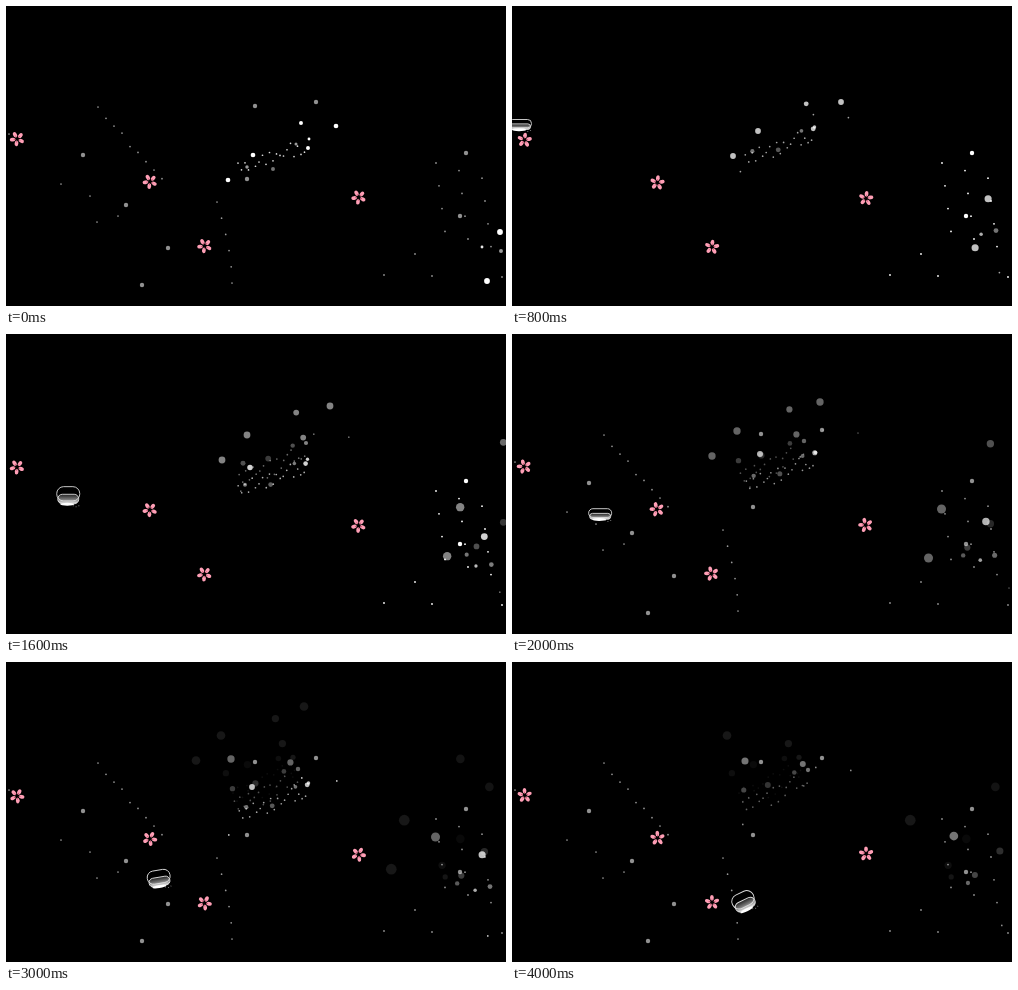
An HTML page with a canvas that plays this animation: 500 px wide and 300 px high, repeating every 4200 ms.

```html
<!DOCTYPE html>
<html lang="en">
<head>
<meta charset="utf-8">
<title>Night petals</title>
<style>
html, body { margin: 0; width: 100%; height: 100%; overflow: hidden; background: #000; }
canvas { display: block; }
</style>
</head>
<body>
<canvas id="stage" width="500" height="300"></canvas>
<script>
const ctx = document.getElementById('stage').getContext('2d');
const LOOP = 4200, STEP = 200, TAU = Math.PI * 2;
const BIRTHS = [0, 1000, 2200], LIFE = 3200;

// Wind offsets, one key point every 400 ms of age
const WIND_X = [0, -5, -1, 3, -6, -22, -31, -38, -26];
const WIND_Y = [0, -7, -24, -34, -48, -52, -57, -71, -80];

// Particles: x, y, depth, brightness; the first group appears in one burst only
const ONCE = [[222, 174, 1, 1], [330, 120, 1, 1], [295, 117, .8, 1], [481, 275, 1.3, 1], [528, 149, 1, .8]];
const REPEATED = [
  [247, 149, 1, 1], [302, 142, .8, 1], [267, 163, .8, .45], [241, 161, .66, .6],
  [290, 138, .55, .6], [303, 133, .5, 1],
  [494, 226, 1.3, 1], [557, 177, 1, .8], [528, 229, 1, .4], [495, 245, .8, .6], [476, 241, .5, .9]
];
const BIG_BLINK = [[77, 149], [120, 199], [162, 242], [136, 279], [249, 100], [310, 96], [241, 173]];
const BIG_STARS = [[460, 147], [454, 210]];
const FLOWERS = [[11.8, 133.5], [144.6, 176.2], [199.2, 240.5], [353.3, 191.9]];

let seed = 11;
function rand(min, max) {
  seed = seed * 16807 % 2147483647;
  return min + (max - min) * seed / 2147483647;
}
const scatter = (n, place) => Array.from({ length: n }, (_, i) => place(i));

const BLINK = [
  ...scatter(9, i => [92 + i * 8, 104 + i * 8.6 + rand(-3, 3)]),
  ...scatter(6, i => [211 + 15 * Math.sin(i * .31), 196 + i * 16.2]),
  [3, 128], [55, 178], [84, 190], [112, 210], [91, 216]
];
const STARS = [
  ...scatter(12, i => [430 + i * 23 % 66, 157 + i * 7.6]),
  [409, 248], [378, 269], [426, 270], [496, 271]
];
const SPECKS = scatter(20, i => [232 + i * 3.5, 160 - i + rand(-8, 10), rand(.3, .5)]);

function wind(age, right) {
  const i = Math.min(Math.floor(age / 400), WIND_X.length - 2), k = age / 400 - i;
  const mix = list => list[i] + (list[i + 1] - list[i]) * k;
  // The right cloud is blown further left and circles a little
  return right
    ? [mix(WIND_X) - age * .0208, mix(WIND_Y) - 9 * Math.sin(age / 600)]
    : [mix(WIND_X), mix(WIND_Y)];
}

function dot(x, y, r, a) {
  ctx.fillStyle = `rgba(255,255,255,${a})`;
  ctx.beginPath();
  ctx.arc(x, y, r, 0, TAU);
  ctx.fill();
}

function burst(age, list) {
  for (const [x, y, depth, a] of list) {
    const right = x > 400, s = right ? depth * .78 : depth;
    const [dx, dy] = wind(age, right);
    dot(x + dx * s, y + dy * s, (.5 + 1.85 * depth) * (1 + age * .00028), a * (1 - age / 3300));
  }
}

function specks(age) {
  const [dx, dy] = wind(age);
  for (const [x, y, s] of SPECKS) dot(x + dx * s + age * .002, y + dy * s, .85, .85 * (1 - age / LIFE));
}

function sparks(age) {
  for (const [x, y] of ONCE) dot(x + age * .008, y - age * .0105, .85, .85 * (1 - age / LIFE));
}

function stars(t) {
  const lit = t % 1000 < 600, a = lit ? .57 : 1;
  if (lit) {
    for (const [x, y] of BLINK) dot(x, y, .85, .6);
    for (const [x, y] of BIG_BLINK) dot(x, y, 2.2, .57);
  }
  for (const [x, y] of STARS) dot(x, y, .9, a);
  for (const [x, y] of BIG_STARS) dot(x, y, 2.2, a);
}

function flower(x, y, t) {
  const sway = t / 1700 * TAU - TAU * 3 / 8;
  ctx.save();
  ctx.translate(x + .9 * Math.cos(sway), y + .9 * Math.sin(sway));
  ctx.rotate(t / 8500 * TAU - .48);
  for (let i = 0; i < 5; i++) {
    ctx.fillStyle = '#ff9fb6';
    ctx.beginPath();
    ctx.ellipse(0, -4.6, 1.9, 2.8, 0, 0, TAU);
    ctx.fill();
    ctx.fillStyle = '#b8405f';
    ctx.fillRect(-.3, -3.6, .6, 2);
    ctx.rotate(TAU / 5);
  }
  ctx.restore();
}

function wing(top, bottom, half) {
  ctx.beginPath();
  ctx.roundRect(-half, top, half * 2, bottom - top, (bottom - top) * .48);
}

function butterfly(t) {
  if (t < 600) return;
  const u = (t - 800) / 3200;
  const open = .5 - .5 * Math.cos((t - 800) / 1320 * TAU);
  const h = 5.5 + 4.5 * open;
  ctx.save();
  ctx.translate(8 + 224 * u - 9 * Math.sin(Math.PI * u * u), 119 + 190 * u - 69 * u * u);
  ctx.rotate(-.45 * Math.max(0, u * 2 - 1));
  const glow = ctx.createLinearGradient(0, -h * .2, 0, h * .85);
  glow.addColorStop(0, '#222');
  glow.addColorStop(.5, '#777');
  glow.addColorStop(1, '#fff');
  ctx.lineWidth = .9;
  ctx.strokeStyle = '#ddd';
  ctx.fillStyle = glow;
  wing(-h * .2, h * .8, 10.5);
  ctx.fill();
  ctx.stroke();
  wing(-h, h * .5, 11.5);
  ctx.stroke();
  ctx.fillStyle = '#fff';
  ctx.beginPath();
  ctx.ellipse(-1, h * .85, 7, 1.5, 0, 0, TAU);
  ctx.fill();
  for (let i = 0; i < 3; i++) dot(5 + i * 2.8, h + i % 2, .5, .6);
  ctx.restore();
}

function draw(now) {
  const t = Math.floor(now % LOOP / STEP) * STEP;
  ctx.fillStyle = '#000';
  ctx.fillRect(0, 0, 500, 300);
  for (const birth of BIRTHS) {
    const age = t - birth;
    if (age < 0 || age >= LIFE) continue;
    burst(age, birth ? REPEATED : [...ONCE, ...REPEATED]);
    specks(age);
  }
  sparks(t % 2900);
  stars(t);
  butterfly(t);
  for (const [x, y] of FLOWERS) flower(x, y, t);
}

let start;
function tick(now) {
  start ??= now;
  draw(now - start);
  requestAnimationFrame(tick);
}
draw(0);
requestAnimationFrame(tick);
</script>
</body>
</html>
```
